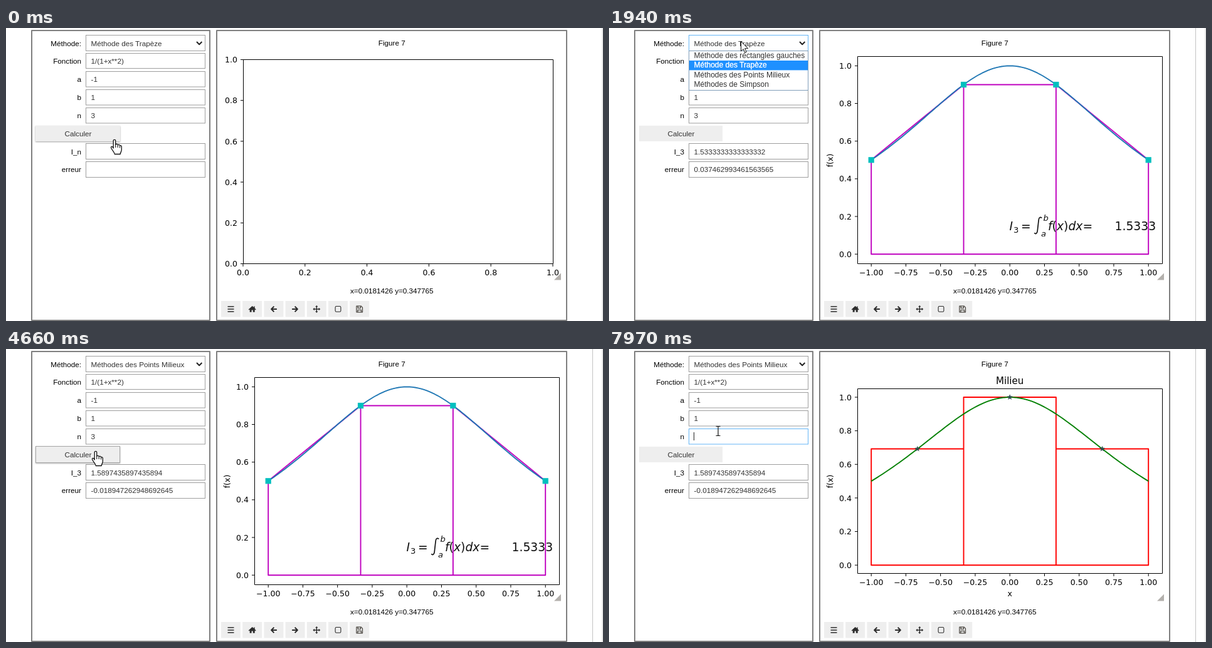
An HTML page that plays this animation: 952 by 468 pixels, repeating every 8 s.

```html
<!DOCTYPE html>
<html lang="fr">
<head>
<meta charset="utf-8">
<title>Intégration numérique</title>
<style>
html, body { margin: 0; width: 100%; height: 100%; overflow: hidden; background: #fff; }
svg { display: block; width: 952px; height: 468px; }
.ui { font: 11.7px "Liberation Sans", Arial, sans-serif; }
.list { font-size: 12px; }
.val { fill: #333; }
.field { fill: #fff; stroke: #9e9e9e; }
.plot { font: 12.5px "DejaVu Sans", sans-serif; }
.math { font-size: 18.75px; fill: #111; }
.it { font-style: italic; }
.hover { filter: drop-shadow(0 1.5px 1.3px rgba(0,0,0,.38)); }
.focus { filter: drop-shadow(0 1.5px 1.3px rgba(0,0,0,.3)); }
</style>
</head>
<body>
<svg id="stage" viewBox="0 0 952 468"></svg>
<script>
const LOOP = 8000;
const METHODS = ['Méthode des réctangles gauches', 'Méthode des Trapèze',
  'Méthodes des Points Milieux', 'Méthodes de Simpson'];
const ROW_TOP = 36.6, ROW_H = 15.4;
const FIELD_TOPS = [40, 69, 98, 127, 184, 213];

// Pointer moves: start, end, number of steps, target x, y
const START = [173, 178];
const MOVES = [
  [70, 230, 3, 161, 174], [1000, 1170, 3, 177, 94], [1230, 1630, 6, 210, 27],
  [1940, 1940, 1, 210, 21], [2170, 2470, 5, 224, 62], [2640, 2710, 2, 225, 66],
  [2790, 2870, 2, 226, 69], [3330, 3630, 5, 175, 130], [3800, 3800, 1, 163, 141],
  [3880, 4190, 5, 143, 163], [5760, 6220, 7, 168, 92], [6370, 6430, 2, 168, 120],
  [6660, 6970, 5, 174, 131]
];

const f = x => 1 / (1 + x * x);
const text = (x, y, s, attrs = '') => `<text x="${x}" y="${y}" ${attrs}>${s}</text>`;
const rect = (x, y, w, h, attrs) => `<rect x="${x}" y="${y}" width="${w}" height="${h}" ${attrs}/>`;
const path = (d, attrs) => `<path d="${d}" ${attrs}/>`;
const group = (id, body, attrs = '') => `<g id="${id}" ${attrs}>${body}</g>`;
const END = 'text-anchor="end"', MID = 'text-anchor="middle"';
const line = (color, w = 1.9) => `fill="none" stroke="${color}" stroke-width="${w}" stroke-linejoin="round"`;

// Axes box with ticks; X and Y map data to pixels
function axes([l, t, r, b], X, Y, xTicks, xDigits) {
  let s = rect(l, t, r - l, b - t, line('#000', 1));
  let ticks = '';
  for (const v of xTicks) {
    ticks += `M${X(v)} ${b}v4.5`;
    s += text(X(v), b + 18.7, v.toFixed(xDigits).replace('-', '−'), MID);
  }
  for (let i = 0; i <= 5; i++) {
    const y = Y(i / 5);
    ticks += `M${l} ${y}h-4.5`;
    s += text(l - 9.5, y + 4.6, (i / 5).toFixed(1), END);
  }
  return s + path(ticks, line('#000', 1));
}

function curve(X, Y, color) {
  let d = '';
  for (let i = 0; i <= 100; i++) {
    const x = -1 + i / 50;
    d += `${i ? 'L' : 'M'}${X(x).toFixed(2)} ${Y(f(x)).toFixed(2)}`;
  }
  return path(d, line(color));
}

const X = x => 639.2 + 221 * x;
const quarters = Array.from({ length: 9 }, (_, i) => -1 + i / 4);
const nodes = [-1, -1 / 3, 1 / 3, 1];
const yLabel = text(0, 0, 'f(x)', `transform="translate(357 211.5) rotate(-90)" ${MID}`);

// One closed panel per interval, with heights given at both ends
const panels = (Y, left, right, color) => path(nodes.slice(0, 3).map((a, i) => {
  const b = nodes[i + 1];
  return `M${X(a)} ${Y(0)}V${Y(left(a, b))}L${X(b)} ${Y(right(a, b))}V${Y(0)}Z`;
}).join(''), line(color));

function emptyPlot() {
  return axes([378.5, 50.5, 872.5, 376.5], x => 378 + 494 * x, y => 376.5 - 326 * y,
    [0, .2, .4, .6, .8, 1], 1);
}

function trapezePlot() {
  const Y = y => 361.2 - 300.8 * y;
  const m = (x, y, s, attrs = '') => text(x, y, s, `class="math ${attrs ? 'it' : ''}" ${attrs === 'it' ? '' : attrs}`);
  const small = 'style="font-size:13.1px"';
  return axes([396.5, 45.5, 882.5, 376.5], X, Y, quarters, 2) + yLabel +
    panels(Y, a => f(a), (a, b) => f(b), '#bf00bf') + curve(X, Y, '#1f77b4') +
    nodes.map(x => rect(X(x) - 4.6, Y(f(x)) - 4.6, 9.2, 9.2, 'fill="#00bfbf"')).join('') +
    m(638.5, 323, 'I', 'it') + text(645, 326.5, '3', `class="math" ${small}`) + m(657, 323, '=') +
    path('M690.2 303.6C688.5 301.3 685.6 302.2 685.2 306.5L683.2 324C682.7 328.6 680.2 329.6 678.3 327.3',
      line('#111', 1.7)) +
    m(692.5, 307.5, 'b', small) + m(689, 332.5, 'a', small) +
    text(700, 323, '<tspan class="it">f</tspan>(<tspan class="it">x</tspan>)<tspan class="it">dx</tspan>=', 'class="math"') +
    m(806.5, 323, '1.5333');
}

function star(cx, cy) {
  let d = '';
  for (let i = 0; i < 10; i++) {
    const r = i % 2 ? 2.1 : 4.8, a = i * Math.PI / 5;
    d += `${i ? 'L' : 'M'}${cx + r * Math.sin(a)} ${cy - r * Math.cos(a)}`;
  }
  return path(d + 'Z', 'fill="#2f4f4f"');
}

function middlePlot() {
  const Y = y => 345.2 - 268.2 * y, mid = (a, b) => f((a + b) / 2);
  return axes([396.5, 63.5, 882.5, 358.5], X, Y, quarters, 2) + yLabel +
    text(639.2, 56, 'Milieu', `${MID} style="font-size:15px"`) + text(639.2, 395, 'x', MID) +
    panels(Y, mid, mid, '#f00') + curve(X, Y, '#008000') +
    [-2 / 3, 0, 2 / 3].map(x => star(X(x), Y(f(x)))).join('');
}

function toolbar() {
  const ink = '#2b2b2b', s = line(ink, 1.9);
  const icons = [
    path('M-5-4H5M-5 0H5M-5 4H5', line(ink, 1.7)),
    path('M0-5L2.6-2.7V-4.5H4V-1.4L6 .4 5.1 1.4 4 .6V4.8H1.1V1.6H-1.1V4.8H-4V.6L-5.1 1.4-6 .4Z', `fill="${ink}"`),
    path('M5 0H-3.5M.5-4.2L-3.8 0 .5 4.2', s),
    path('M-5 0H3.5M-.5-4.2L3.8 0-.5 4.2', s),
    path('M-4 0H4M0-4V4', line(ink, 1.4)) +
      path('M0-6L2.2-3.4H-2.2ZM0 6L2.2 3.4H-2.2ZM-6 0L-3.4-2.2V2.2ZM6 0L3.4-2.2V2.2Z', `fill="${ink}"`),
    rect(-4.4, -4.5, 8.8, 8.8, `rx="1.8" ${line(ink, 1.1)}`),
    path('M-4.8-4.8H2.6L4.8-2.6V4.8H-4.8ZM-2.6-4.8V-1.6H1.8V-4.8M-2.8 4.8V1.4H2.8V4.8', line('#44403a', 1.2))
  ];
  return icons.map((icon, i) => {
    const x = 343 + i * 34.2;
    return rect(x, 436, 31, 25.5, 'fill="#eee"') + `<g transform="translate(${x + 15.5} 449)">${icon}</g>`;
  }).join('');
}

function form() {
  const labels = [['Méthode:', 28.5], ['Fonction', 57], ['a', 86], ['b', 115], ['n', 144], ['erreur', 230]];
  const values = [[57, '1/(1+x**2)'], [86, '-1'], [115, '1']];
  return labels.map(([s, y]) => text(120, y, s, END)).join('') +
    text(120, 202, '', `id="sumLabel" ${END}`) +
    rect(127.5, 11.5, 190, 25, 'class="field" id="select"') +
    path('M304 22L308.2 26.2 312.4 22', line('#222', 2)) +
    FIELD_TOPS.map((y, i) => rect(127.5, y + .5, 190, i === 0 ? 24 : i < 4 ? 24.5 : 25,
      `class="field" ${i === 3 ? 'id="nField"' : ''}`)).join('') +
    values.map(([y, s]) => text(135.5, y, s, 'class="val"')).join('') +
    [['method', 28.5], ['count', 144], ['sum', 202], ['error', 230]]
      .map(([id, y]) => text(135.5, y, '', `class="val" id="${id}"`)).join('') +
    rect(135, 133, 1, 13, 'id="caret" fill="#222"') +
    rect(48, 156, 133, 25, 'id="button"') + text(115, 172.7, 'Calculer', `class="val" ${MID}`);
}

const dropdown = () => rect(127.5, 36.5, 190, 63, 'fill="#fff" stroke="#7f9db9"') +
  rect(128, 0, 189, ROW_H, 'id="mark" fill="#1e90ff"') +
  METHODS.map((s, i) => text(135.5, 48 + i * ROW_H, s, 'class="item"')).join('');

const hand = path('M-1.8 14V1.8C-1.8-.1 1.7-.1 1.7 1.8V8.2C2.3 7 5 7.2 5.2 9 6 7.9 8.3 8.3 8.5 10 9.5 9.2 11.3 9.8 11.3 11.5V16.5C11.3 19 9.5 20.5 9.2 23.5H.2C0 20.5-3 18.5-5.3 13.8-6.2 11.8-4.2 10.6-2.9 12.2Z',
  'fill="#fff" stroke="#111" stroke-width="1.3" stroke-linejoin="round"') +
  path('M1.7 8V13M5.2 9.4V13M8.5 10.4V13.5', line('#111', 1.1));
const beam = path('M-3.5-7.5H-1Q0-7.5 0-6.5 0-7.5 1-7.5H3.5M0-6.5V6.5M-3.5 7.5H-1Q0 7.5 0 6.5 0 7.5 1 7.5H3.5', line('#111', 1.2));
const arrow = path('M.5.5V16L4.2 12.6 6.8 18.4 9.2 17.3 6.6 11.7H11.6Z', 'fill="#fff" stroke="#111" stroke-linejoin="round"');

const stage = document.getElementById('stage');
stage.innerHTML = rect(0, 0, 952, 468, 'fill="#fff"') +
  rect(950, 0, 2, 468, 'fill="#e6e6e6"') + rect(935, 0, 1, 468, 'id="edge" fill="#c4c4c4"') +
  rect(41, 4, 284, 463, line('#7f7f7f', 2)) + rect(336, 4, 558, 463, line('#7f7f7f', 2)) +
  `<g class="ui">${form()}${text(615.3, 28, 'Figure 7', MID)}${text(615.3, 424, 'x=0.0181426 y=0.347765', MID)}</g>` +
  toolbar() +
  `<g class="plot">${group('empty', emptyPlot())}${group('trapeze', trapezePlot())}${group('middle', middlePlot())}</g>` +
  path('M885 391.5V402.5H874Z', 'fill="#b3b0ac"') +
  group('list', dropdown(), 'class="ui list"') +
  group('cursor', group('hand', hand) + group('beam', beam) + group('arrow', arrow));

const el = {};
stage.querySelectorAll('[id]').forEach(e => el[e.id] = e);
const items = [...stage.querySelectorAll('.item')];
const show = (e, on) => e.style.display = on ? '' : 'none';
const set = (e, attrs) => { for (const k in attrs) e.setAttribute(k, attrs[k]); };
const within = (t, a, b) => t >= a && t < b;

function pointer(t) {
  let [x, y] = START;
  for (const [t0, t1, n, tx, ty] of MOVES) {
    if (t < t0) break;
    const gap = n > 1 ? (t1 - t0) / (n - 1) : 1;
    const k = t >= t1 ? 1 : Math.min(n, 1 + Math.floor((t - t0) / gap)) / n;
    x += (tx - x) * k;
    y += (ty - y) * k;
  }
  return [x, y];
}

function draw(t) {
  const [x, y] = pointer(t);
  const open = within(t, 1870, 3020);
  const onButton = !open && within(x, 47, 183) && within(y, 155, 182);
  const onField = !open && x > 127 && FIELD_TOPS.some(top => within(y, top - 1.5, top + 26.5));
  show(el.hand, onButton);
  show(el.beam, !onButton && onField);
  show(el.arrow, !onButton && !onField);
  set(el.cursor, { transform: `translate(${x.toFixed(1)} ${y.toFixed(1)})` });

  const pressed = within(t, 380, 540) || within(t, 4420, 4570);
  const focused = within(t, 380, 1800) || within(t, 4420, 6890);
  const pad = focused ? .5 : onButton ? 1 : 0;
  set(el.button, {
    x: 48 - pad, y: focused ? 155.5 : 156, width: 133 + 2 * pad, height: focused ? 26 : 25,
    fill: pressed ? '#bdbdbd' : '#eee', stroke: focused ? '#a6a6a6' : 'none',
    class: focused ? 'focus' : onButton ? 'hover' : ''
  });

  el.select.style.stroke = within(t, 1800, 4420) ? '#64b5f6' : '';
  el.nField.style.stroke = t >= 6890 ? '#64b5f6' : '';
  el.method.textContent = METHODS[t < 3020 ? 1 : 2];
  el.count.textContent = t < 7750 ? '3' : '';
  show(el.caret, within(t, 6970, 7450) || t >= 7970);
  set(el.caret, { x: t < 7750 ? 142 : 135 });

  const done = t >= 620, redone = t >= 4660;
  el.sumLabel.textContent = done ? 'I_3' : 'I_n';
  el.sum.textContent = redone ? '1.5897435897435894' : done ? '1.5333333333333332' : '';
  el.error.textContent = redone ? '-0.018947262948692645' : done ? '0.037462993461563565' : '';

  show(el.empty, t < 700);
  show(el.trapeze, within(t, 700, 4730));
  show(el.middle, t >= 4730);
  show(el.edge, t >= 700);

  show(el.list, open);
  const row = y < ROW_TOP ? 1 : Math.floor((y - ROW_TOP) / ROW_H);
  set(el.mark, { y: ROW_TOP + row * ROW_H });
  items.forEach((e, i) => set(e, i === row
    ? { fill: '#fff', stroke: '#fff', 'stroke-width': .35 }
    : { fill: '#333', stroke: 'none' }));
}

const begin = performance.now();
function tick() {
  draw((performance.now() - begin) % LOOP);
  requestAnimationFrame(tick);
}
tick();
</script>
</body>
</html>
```
